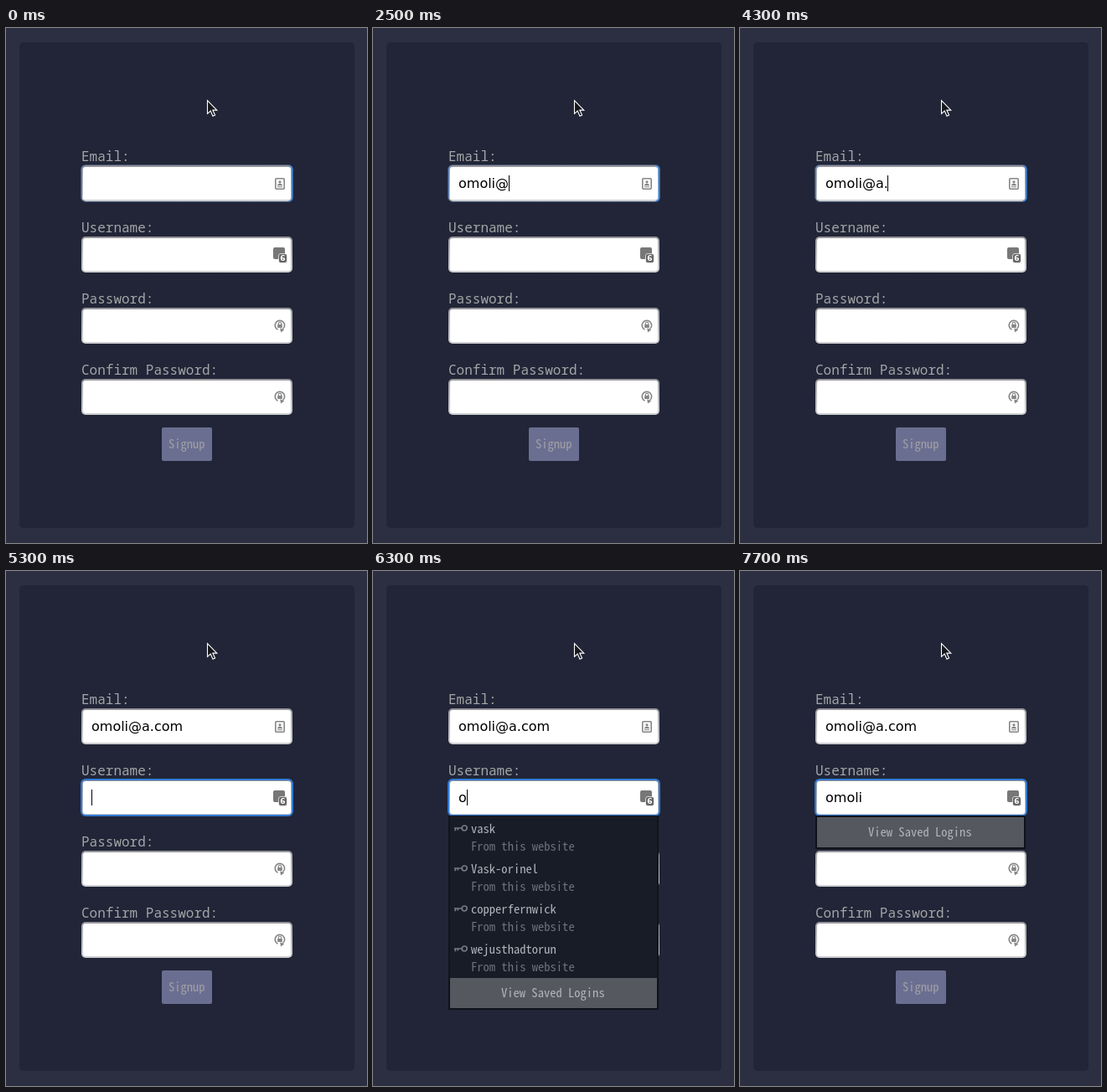
These frames come from a looping animation (431x615 px, 8000 ms). An HTML page:

```html
<!DOCTYPE html>
<html lang="en">
<head>
<meta charset="utf-8">
<title>Signup form</title>
<style>
  html, body { margin: 0; width: 100%; height: 100%; overflow: hidden; background: #2c2e41; }
  svg { display: block; width: 431px; height: 615px; }
  text { white-space: pre; }
  .label { font: 16px "Roboto Mono", "Noto Sans Mono", monospace; fill: #a5a5a7; }
  .value { font: 16px "DejaVu Sans", sans-serif; fill: #000; }
  .narrow { font: 14.55px "Noto Sans Mono CJK JP", "Noto Sans Mono", monospace; fill: #b1b4bb; }
  .hint { fill: #6d717b; }
  .button { fill: #a0a0a6; }
  .badge { font: bold 9px "DejaVu Sans", sans-serif; fill: #fff; text-anchor: middle; }
  .icon { fill: none; stroke: #868686; stroke-width: 1.6; }
  .key { fill: none; stroke: #767982; stroke-width: 1.7; }
</style>
</head>
<body>
<svg viewBox="0 0 431 615">
  <defs>
    <linearGradient id="edge" x1="0" y1="0" x2="0" y2="1">
      <stop offset="0" stop-color="#919196"/>
      <stop offset=".12" stop-color="#aaaaae"/>
      <stop offset="1" stop-color="#cfcfd2"/>
    </linearGradient>
    <g id="field">
      <rect width="252" height="43" rx="5" fill="url(#edge)"/>
      <rect x="2" y="2" width="248" height="39" rx="3" fill="#fff"/>
    </g>
    <g id="lock">
      <path class="icon" d="M-2.5 5.2A5.7 5.7 0 1 1 3.2 4.7"/>
      <path d="M.3 3.2L5.2 5.4 1 8.4z" fill="#868686"/>
      <rect x="-2.8" y="-1" width="5.6" height="4" fill="#868686"/>
      <path d="M-1.6-1v-1.2a1.6 1.6 0 0 1 3.2 0V-1" fill="none" stroke="#868686" stroke-width="1.1"/>
    </g>
    <g id="key" class="key">
      <circle cx="12.2" cy="0" r="3"/>
      <path d="M9 0H0M1.3 0v3.2M4.3 0v2.6"/>
    </g>
  </defs>

  <rect width="431" height="615" fill="#2c2e41"/>
  <rect x="16" y="17" width="400" height="580" rx="5" fill="#212537"/>

  <text class="label" x="90" y="158.500">Email:</text>
  <text class="label" x="90" y="243.500">Username:</text>
  <text class="label" x="90" y="328.500">Password:</text>
  <text class="label" x="90" y="413.500">Confirm Password:</text>
  <use href="#field" x="90" y="164"/>
  <use href="#field" x="90" y="249"/>
  <use href="#field" x="90" y="334"/>
  <use href="#field" x="90" y="419"/>

  <g id="emailFocus" fill="none">
    <rect x="89.500" y="163.500" width="253" height="44" rx="5.500" stroke="#46597b"/>
    <path d="M90.500 203v-35q0-3.500 3.500-3.500" stroke="#5f86b8"/>
    <path d="M338 164.500q3.500 0 3.500 4v34q0 4-3.500 4" stroke="#3584e4" stroke-width="1.600"/>
  </g>
  <rect id="userFocus" x="90" y="249" width="252" height="43" rx="5" fill="none" stroke="#3079d3" stroke-width="2"/>

  <g transform="translate(321 179)">
    <rect class="icon" x=".8" y=".8" width="10.400" height="12.400" rx="1"/>
    <circle cx="6" cy="4.800" r="1.600" fill="#868686"/>
    <path d="M3 9.200q0-2.500 3-2.500t3 2.500zM3 10.200h6v1H3z" fill="#868686"/>
  </g>
  <rect x="319" y="262" width="14" height="14" rx="2" fill="#777"/>
  <rect x="325.500" y="269.500" width="10" height="11" rx="2.500" fill="#666" stroke="#fff" stroke-width=".7"/>
  <text class="badge" x="330.500" y="278.300">6</text>
  <use href="#lock" x="327" y="355"/>
  <use href="#lock" x="327" y="440"/>

  <rect x="186" y="477" width="60" height="40" rx="2" fill="#6a6f91"/>
  <text class="narrow button" x="194" y="502">Signup</text>

  <text id="email" class="value" x="102" y="191"></text>
  <text id="user" class="value" x="102" y="276"></text>
  <rect id="caret" width="1" height="19" fill="#000"/>

  <g id="menu">
    <rect id="menuBox" x="90" y="292" width="251" fill="#10121a"/>
    <g id="logins"><rect x="91.500" y="292.500" width="248" height="194" fill="#181c27"/></g>
    <g id="footer">
      <rect x="92" y="0" width="247" height="36" fill="#565860"/>
      <text class="narrow" x="153" y="23">View Saved Logins</text>
    </g>
  </g>

  <path d="M240.500 86.500v15.800l3.700-3.300 2.800 6.300 2.600-1.200-2.800-6h5z" fill="#16171c" stroke="#fff" stroke-width="1.100"/>
</svg>
<script>
  const LOOP = 8000;
  const ADDRESS = "omoli@a.com", USER = "omoli";
  const LOGINS = ["vask", "Vask-orinel", "copperfernwick", "wejusthadtorun"];
  const emailKeys = [1000, 1200, 1400, 1500, 1700, 2500, 3500, 4300, 4400, 4700, 4800];
  const userKeys = [6300, 6500, 6700, 6800, 7000];
  const caretStops = [102, 112, 127, 137, 141, 146, 162, 171, 176, 185, 195, 210];
  const caretOff = [[0, 200], [1500, 1700], [2700, 3500], [3900, 4300], [5100, 5300], [7700, LOOP]];
  const SWITCH = 5300, OPEN = 5600, COLLAPSE = 6400;

  const el = id => document.getElementById(id);
  const show = (id, on) => el(id).setAttribute("visibility", on ? "inherit" : "hidden");
  const typed = (keys, t) => keys.filter(k => k <= t).length;

  el("logins").innerHTML += LOGINS.map((name, i) => `
    <g transform="translate(0 ${i * 48})">
      <use href="#key" x="97" y="307"/>
      <text class="narrow" x="117" y="313">${name}</text>
      <text class="narrow hint" x="117" y="334">From this website</text>
    </g>`).join("");

  function draw(t) {
    const onUser = t >= SWITCH, full = t < COLLAPSE;
    const emailCount = typed(emailKeys, t), userCount = typed(userKeys, t);
    el("email").textContent = ADDRESS.slice(0, emailCount);
    el("user").textContent = USER.slice(0, userCount);
    show("emailFocus", !onUser);
    show("userFocus", onUser);

    el("caret").setAttribute("x", caretStops[onUser ? userCount : emailCount]);
    el("caret").setAttribute("y", onUser ? 261 : 176);
    show("caret", !caretOff.some(([a, b]) => t >= a && t < b));

    el("menu").setAttribute("visibility", t >= OPEN ? "visible" : "hidden");
    show("logins", full);
    el("menuBox").setAttribute("height", full ? 232 : 40);
    el("footer").setAttribute("transform", `translate(0 ${full ? 486 : 294})`);
  }

  const start = performance.now();
  function tick() {
    draw((performance.now() - start) % LOOP);
    requestAnimationFrame(tick);
  }
  tick();
</script>
</body>
</html>
```
